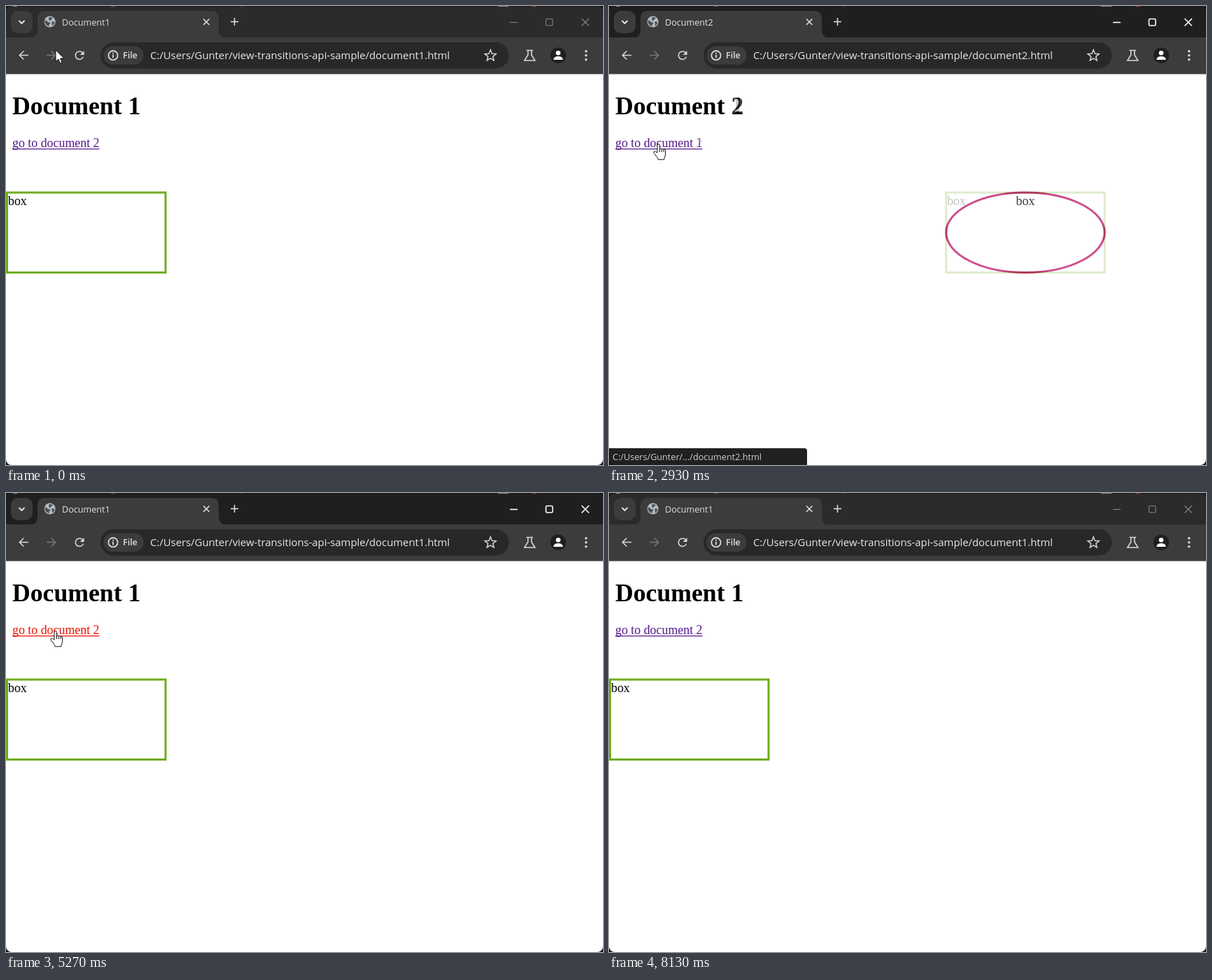
Animation of 853x657 px, one loop 8.34 s. Source, as an HTML page with a canvas:

```html
<!DOCTYPE html>
<html lang="en">
<head>
<meta charset="utf-8">
<title>View transition</title>
<style>
  html, body { margin: 0; width: 100%; height: 100%; overflow: hidden; background: #fff; }
  canvas { display: block; }
</style>
</head>
<body>
<canvas id="stage" width="853" height="657"></canvas>
<script>
const W = 853, H = 657, LOOP = 8340, STEP = 200 / 3;
const UI = '"Open Sans", "Noto Sans", sans-serif';
const SERIF = '"Liberation Serif", "Times New Roman", serif';
const GREEN = '#6fac1e', PINK = '#be1868';
const BOX = { y: 265.5, w: 229.5, h: 117.5, line: 3 };

// Each click presses the link, then the other document slides in.
const CLICKS = [
  { down: 2590, up: 2740, start: 2816 },
  { down: 3990, up: 4040, start: 4070 },
  { down: 5260, up: 5310, start: 5337 },
  { down: 6590, up: 6630, start: 6634 }
];
const FADE = 250;

const layer = () => {
  const c = document.createElement('canvas');
  c.width = W;
  c.height = H;
  return c.getContext('2d');
};
const ctx = document.getElementById('stage').getContext('2d');
const scratch = layer(), sum = layer();

const clamp = v => Math.min(1, Math.max(0, v));
const span = (t, a, b) => clamp((t - a) / (b - a));
const lerp = (a, b, p) => a + (b - a) * p;
const smooth = p => p * p * (3 - 2 * p);

// CSS "ease": cubic-bezier(.25, .1, .25, 1)
function ease(x) {
  if (x <= 0 || x >= 1) return clamp(x);
  let lo = 0, hi = 1;
  for (let i = 0; i < 24; i++) {
    const s = (lo + hi) / 2;
    if (0.75 * s * (1 - s) + s ** 3 < x) lo = s; else hi = s;
  }
  return 0.3 * lo * (1 - lo) ** 2 + 3 * lo * lo * (1 - lo) + lo ** 3;
}

function text(g, str, x, y, font, color, align = 'left') {
  g.font = font;
  g.fillStyle = color;
  g.textAlign = align;
  g.fillText(str, x, y);
}

function rect(g, x, y, w, h, color, r = 0) {
  g.fillStyle = color;
  g.beginPath();
  g.roundRect(x, y, w, h, r);
  g.fill();
}

function disc(g, x, y, r, color) {
  g.fillStyle = color;
  g.beginPath();
  g.arc(x, y, r, 0, 7);
  g.fill();
}

function stroke(d, color, width = 1.6) {
  ctx.strokeStyle = color;
  ctx.lineWidth = width;
  ctx.stroke(new Path2D(d));
}

// Additive cross-fade of two painted layers.
function mix(from, to, p) {
  if (p >= 1) return to(ctx);
  sum.clearRect(0, 0, W, H);
  sum.globalCompositeOperation = 'lighter';
  for (const [paint, alpha] of [[from, 1 - p], [to, p]]) {
    scratch.clearRect(0, 0, W, H);
    paint(scratch);
    sum.globalAlpha = alpha;
    sum.drawImage(scratch.canvas, 0, 0);
  }
  ctx.drawImage(sum.canvas, 0, 0);
}

const page = (doc, pressed) => g => {
  const link = pressed ? '#ee1100' : '#551a8b';
  rect(g, 0, 97, W, H - 97, '#fff');
  text(g, 'Document ' + doc, 9, 154.8, 'bold 35.7px ' + SERIF, '#000');
  text(g, 'go to document ' + (3 - doc), 9, 202.4, '17.87px ' + SERIF, link);
  rect(g, 9, 204, 124.6, 1.2, link);
};

const box = (doc, x) => g => {
  const { y, w, h, line } = BOX, half = line / 2;
  g.lineWidth = line;
  g.strokeStyle = doc === 1 ? GREEN : PINK;
  g.beginPath();
  if (doc === 1) g.rect(x + half, y + half, w - line, h - line);
  else g.ellipse(x + w / 2, y + h / 2, w / 2 - half, h / 2 - half, 0, 0, 7);
  g.stroke();
  const font = '17.87px ' + SERIF;
  if (doc === 1) text(g, 'box', x + line, 284.6, font, '#000');
  else text(g, 'box', x + w / 2, 284.6, font, '#000', 'center');
};

function tabStrip(doc, active) {
  const bar = active ? '#1f1f1f' : '#2b2b2b', tab = '#3c3c3c';
  rect(ctx, 0, 0, W, 46, bar);
  rect(ctx, 0, 0, W, 1, '#191919');
  for (const [x, w, c] of [[10, 6, '#8a8a8a'], [150, 6, '#555'], [336, 2, '#555'], [703, 15, '#888'], [752, 6, '#b03a20']])
    rect(ctx, x, 0, w, 1, c);
  rect(ctx, 7, 7, 31, 32, tab, 10);
  stroke('M18.5 21l4 4l4-4', '#e8e8e8', 1.8);
  ctx.fillStyle = tab;
  ctx.fill(new Path2D('M34 46Q45 45 45 34V18Q45 7 56 7H293Q304 7 304 18V34Q304 45 315 46Z'));

  disc(ctx, 62.7, 22.5, 8, '#b4bcc2');
  ctx.fillStyle = '#4a5054';
  ctx.fill(new Path2D('M57 20q3 4 6 3.500q1 2-1.500 3v3q-5-2-6-7z M61 16.500q4-1 5 0q1 2-1.500 2.500q-1 3-3 1.500z M65 22.500q3-1 4.500 1q-1 4-4 5q1-3-.5-6z'));

  text(ctx, 'Document' + doc, 80, 28, '12.6px ' + UI, active ? '#e6e6e6' : '#dedede');
  stroke('M282 18.500l8.500 8.500M290.500 18.500l-8.500 8.500', '#e3e3e3', 1.5);
  stroke('M321 22.500h11M326.500 17v11', '#e3e3e3', 1.5);

  const btn = active ? '#fff' : '#858585', line = active ? 1.6 : 1.1;
  stroke('M720 23.500h11', btn, line);
  ctx.beginPath();
  ctx.roundRect(771.5, 18.5, 9.5, 9.5, 1.5);
  ctx.stroke();
  stroke('M822.500 18l10.500 10.500M833 18l-10.500 10.500', btn, line);
}

function toolbar(doc) {
  const icon = '#d6d6d6';
  rect(ctx, 0, 45, W, 52.5, '#3c3c3c');
  stroke('M32 70.500H19.500M25.300 64.500l-6 6l6 6', icon);
  stroke('M58 70.500H70.500M64.700 64.500l6 6l-6 6', '#777');
  ctx.strokeStyle = icon;
  ctx.beginPath();
  ctx.arc(105, 70.7, 5.7, 0.35, 5.6);
  ctx.stroke();
  ctx.fillStyle = icon;
  ctx.fill(new Path2D('M111.600 64v6h-6z'));

  rect(ctx, 135, 52, 583.5, 37.5, '#282828', 18.75);
  rect(ctx, 139.500, 57.5, 57, 26.500, '#3c3c3c', 13);
  ctx.strokeStyle = '#e8e8e8';
  ctx.beginPath();
  ctx.arc(153, 70.7, 6.6, 0, 7);
  ctx.stroke();
  stroke('M153 69.700v4.500M153 66.800v1.700', '#e8e8e8', 1.7);
  text(ctx, 'File', 167, 75.2, '600 12.5px ' + UI, '#e3e3e3');
  text(ctx, `C:/Users/Gunter/view-transitions-api-sample/document${doc}.html`,
    206, 76, '14.85px ' + UI, '#e8e8e8');

  ctx.beginPath();
  for (let i = 0; i < 10; i++) {
    const a = i * Math.PI / 5 - Math.PI / 2, r = i % 2 ? 3.7 : 8.4;
    ctx.lineTo(692.2 + r * Math.cos(a), 71.2 + r * Math.sin(a));
  }
  ctx.closePath();
  ctx.strokeStyle = icon;
  ctx.lineWidth = 1.5;
  ctx.stroke();

  stroke('M743.500 63.500h9.500M745.800 63.500v6.500l-5 8h15l-5-8v-6.500', icon, 1.6);
  disc(ctx, 789, 70.7, 11.2, '#1f1f1f');
  disc(ctx, 789, 67.3, 3.3, '#fff');
  ctx.fillStyle = '#fff';
  ctx.fill(new Path2D('M782.500 77v-1.500q1-3.500 6.500-3.500t6.500 3.500v1.500z'));
  for (const y of [64.7, 70.7, 76.7]) disc(ctx, 828.8, y, 1.8, icon);
}

function status(t) {
  const alpha = span(t, 2490, 2607) * (1 - span(t, 2990, 3195));
  if (!alpha) return;
  ctx.globalAlpha = alpha;
  rect(ctx, 0, 633, 283, 24, '#1f2020', [0, 4, 0, 0]);
  ctx.globalAlpha = Math.sqrt(alpha);
  text(ctx, 'C:/Users/Gunter/.../document2.html', 5, 650, '12.65px ' + UI, '#cfcfcf');
  ctx.globalAlpha = 1;
}

const ARROW = new Path2D('M0 0V16.500L3.800 13L6.300 18.800L9 17.600L6.500 12H11.700Z');
const HAND = new Path2D('M6 13V2.200a1.700 1.700 0 0 1 3.400 0V8c.2-1.200 2.800-1.100 2.900.2c.4-1 2.700-.8 2.800.6c.4-.9 2.500-.7 2.500 1V15c0 3-1.600 4.500-1.800 7.800H7.200C7 20 3.500 17 1 13.200c-.9-1.600 1-3 2.400-1.800z');
const KNUCKLES = new Path2D('M9.400 8v4M12.300 8.500v3.500M15.100 9v3');

const MOVES = [
  { from: 667, to: 1000, x: 89, y: 131.5 },
  { from: 1667, to: 2410, x: 71, y: 197 },
  { from: 6890, to: 7400, x: 62, y: 561 },
  { from: 7400, to: 7733, x: 106, y: 660 }
];

function cursor(t) {
  let x = 71, y = 63;
  for (const m of MOVES) {
    const p = smooth(span(t, m.from, m.to));
    x = lerp(x, m.x, p);
    y = lerp(y, m.y, p);
  }
  if (y > H) return;
  const hand = y > 187 && y < 207;
  ctx.save();
  ctx.translate(hand ? x - 8 : x, y);
  ctx.fillStyle = '#fff';
  ctx.strokeStyle = '#111';
  ctx.lineWidth = 1;
  ctx.fill(hand ? HAND : ARROW);
  ctx.stroke(hand ? HAND : ARROW);
  if (hand) ctx.stroke(KNUCKLES);
  ctx.restore();
}

function corners() {
  ctx.fillStyle = '#151515';
  ctx.beginPath();
  ctx.rect(0, 0, W, H);
  ctx.roundRect(0, 0, W, H, 8);
  ctx.fill('evenodd');
}

function draw(t) {
  const done = CLICKS.filter(c => t >= c.start);
  const doc = 1 + done.length % 2, old = 3 - doc;
  const p = done.length ? ease((t - done[done.length - 1].start) / FADE) : 1;
  const pressed = CLICKS.some(c => t >= c.down && t < c.up);
  const active = t >= 2590 && t < 8130;
  const right = W - BOX.w;
  const x = doc === 2 ? right * p : right * (done.length ? 1 - p : 0);

  rect(ctx, 0, 0, W, H, '#fff');
  mix(page(old, false), page(doc, pressed), p);
  mix(box(old, x), box(doc, x), p);
  tabStrip(doc, active);
  toolbar(doc);
  status(t);
  corners();
  cursor(t);
}

const begin = performance.now();
function tick() {
  const t = (performance.now() - begin) % LOOP;
  draw(Math.floor((t + 5) / STEP) * STEP);
  requestAnimationFrame(tick);
}
tick();
</script>
</body>
</html>
```
